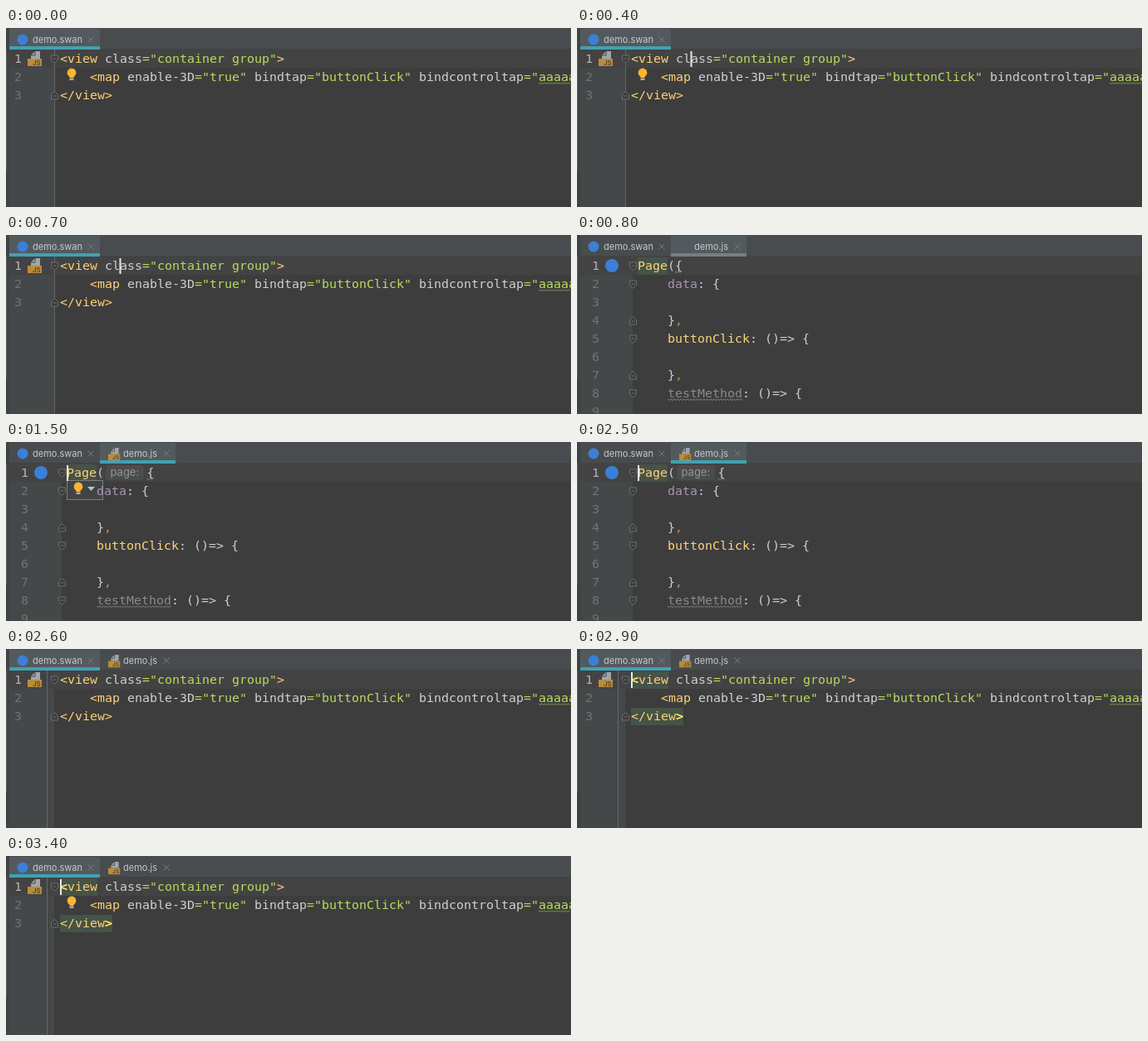
An HTML page with a canvas that plays this animation: 680 by 216 pixels, repeating every 3.5 s.

```html
<!DOCTYPE html>
<html lang="en">
<head>
<meta charset="utf-8">
<title>Editor navigation</title>
<style>
  html, body { margin: 0; width: 100%; height: 100%; overflow: hidden; background: #3d3d3d; }
  canvas { display: block; width: 680px; height: 216px; }
</style>
</head>
<body>
<canvas id="stage" width="680" height="216"></canvas>
<script>
const ctx = document.getElementById('stage').getContext('2d');
const LOOP = 3500, W = 680, H = 216, ROW = 22, CHAR = 9;
const MONO = '14.95px "DejaVu Sans Mono", monospace';
const UI = 'Inter, sans-serif';
const C = {
  bar: '#484c4f', tab: '#535a5d', teal: '#42a0b2', idle: '#787e82',
  editor: '#3d3d3d', line: '#434343', gutter: '#454849', guide: '#646768',
  num: '#707476', numOn: '#b5b5b5', tag: '#ffd078', attr: '#d0d0d0',
  str: '#b8dc5e', plain: '#c8d0d6', fn: '#ffd27a', prop: '#a893bb',
  comma: '#d28a45', unused: '#898989', match: '#465347', caret: '#e8e8e8',
  blue: '#3b7fd6', amber: '#b98d3c', page: '#a0a6aa', bulb: '#fbb52e'
};

// Each code line is a list of [text, colour] runs, starting at a column.
const swanCode = [
  [0, ['<view ', C.tag], ['class', C.attr], ['="container group"', C.str], ['>', C.tag]],
  [4, ['<map ', C.tag], ['enable-3D', C.attr], ['="true" ', C.str], ['bindtap', C.attr],
    ['="buttonClick" ', C.str], ['bindcontroltap', C.attr], ['="aaaaaaa', C.str]],
  [0, ['</view>', C.tag]]
];
const jsCode = [
  [0, ['Page', C.fn], ['(', C.plain]],
  [4, ['data', C.prop], [': {', C.plain]],
  [0],
  [4, ['}', C.plain], [',', C.comma]],
  [4, ['buttonClick', C.fn], [': ()=> {', C.plain]],
  [0],
  [4, ['}', C.plain], [',', C.comma]],
  [4, ['testMethod', C.unused], [': ()=> {', C.plain]],
  [0]
];

const rowY = row => 37 + row * ROW;

function rect(x, y, w, h, color) {
  ctx.fillStyle = color;
  ctx.fillRect(x, y, w, h);
}

function text(s, x, y, color, font = MONO) {
  ctx.font = font;
  ctx.fillStyle = color;
  ctx.fillText(s, x, y);
}

function trace(points) {
  ctx.beginPath();
  points.forEach(([x, y]) => ctx.lineTo(x, y));
}

function fill(points, color) {
  trace(points);
  ctx.fillStyle = color;
  ctx.fill();
}

function stroke(points, color, width = 1, close = false) {
  trace(points);
  if (close) ctx.closePath();
  ctx.strokeStyle = color;
  ctx.lineWidth = width;
  ctx.stroke();
}

function dot(x, y, r, color) {
  ctx.beginPath();
  ctx.arc(x, y, r, 0, Math.PI * 2);
  ctx.fillStyle = color;
  ctx.fill();
}

function wave(x, end, y, color) {
  const points = [];
  for (let i = 0; x + i * 2 <= end; i++) points.push([x + i * 2, y + (i % 2 ? 1.5 : 0)]);
  stroke(points, color, 0.9);
}

function scriptIcon(x, y, scale) {
  ctx.save();
  ctx.translate(x, y);
  ctx.scale(scale, scale);
  fill([[9, 0], [15, 0], [15, 9], [4, 9], [4, 5]], C.page);
  stroke([[4, 5], [9, 5], [9, 0]], C.gutter);
  rect(0, 9, 17, 9, C.amber);
  text('JS', 6, 16.5, '#3f3a2c', `500 8px ${UI}`);
  ctx.restore();
}

function bulb(x, y) {
  dot(x, y - 2, 5.4, C.bulb);
  rect(x - 2.5, y + 2, 5, 2.5, C.bulb);
  rect(x - 2.5, y + 5.2, 5, 1.8, '#b5b5b5');
}

function fold(x, y, dir) {
  const shape = [[-4, -4.5], [4, -4.5], [4, 1], [0, 5], [-4, 1]]
    .map(([a, b]) => [x + a, y + b * dir]);
  fill(shape, C.editor);
  stroke(shape, '#6b6f70', 1, true);
  stroke([[x - 2, y - 0.5 * dir], [x + 2, y - 0.5 * dir]], '#6b6f70');
}

function tab(x, w, label, active, accent) {
  if (active) {
    rect(x, 1, w, 24, C.tab);
    rect(x, 22, w, 4, accent);
  }
  text(label, x + 28, 18, '#c6c9cb', `11px ${UI}`);
  const cx = x + w - 11;
  stroke([[cx - 3.5, 10.5], [cx + 3.5, 17.5]], '#747a7d');
  stroke([[cx + 3.5, 10.5], [cx - 3.5, 17.5]], '#747a7d');
}

function frame(gutterEnd, numX, rows) {
  rect(0, 0, W, H, C.editor);
  rect(0, 26, gutterEnd, H - 26, C.gutter);
  rect(4, 26, W - 4, 22, C.line);
  rect(0, 0, W, 25, C.bar);
  rect(0, 25, W, 1, '#404344');
  rect(0, 0, 4, H, '#3f4345');
  rect(0, 26, 1, 146, '#5a5e60');
  for (let i = 0; i < rows; i++) {
    text(String(i + 1), numX, rowY(i) + 5, i ? C.num : C.numOn);
  }
}

function code(lines, left) {
  lines.forEach(([col, ...runs], row) => {
    let x = left + col * CHAR;
    for (const [s, color] of runs) {
      text(s, x, rowY(row) + 5, color);
      x += s.length * CHAR;
    }
  });
}

function caret(x) {
  rect(x, 28, 2, 19, C.caret);
}

function drawSwan(t) {
  const back = t >= 2600;
  const focused = t >= 2800;
  frame(58, 10, 3);
  tab(4, 109, 'demo.swan', true, C.teal);
  dot(20, 14, 6.5, C.blue);
  if (back) {
    tab(113, 91, 'demo.js', false);
    scriptIcon(123, 7, 0.84);
  }
  rect(back ? 49 : 58, 26, 1, H - 26, C.guide);
  scriptIcon(26, 28, 1);
  if (focused) {
    rect(65, 27, 45, 21, C.match);
    rect(65, 71, 63, 21, C.match);
  }
  fold(58.5, 37.5, 1);
  fold(58.5, 81.5, -1);
  code(swanCode, 65);
  wave(641, W, 66, '#7f9b55');
  if (focused) {
    const bold = 'bold ' + MONO;
    text('<', 65, 42, '#ffe45c', bold);
    text('>', 65 + 6 * CHAR, 86, '#ffe45c', bold);
    caret(65);
  }
  if (t < 600 || t >= 3200) bulb(79, 56);
  if (!back && t >= 400) caret(136.5);
}

function drawJs(t) {
  const ready = t >= 900;
  frame(67, 18, 9);
  tab(4, 109, 'demo.swan', false);
  dot(20, 14, 6.5, C.blue);
  tab(113, 91, 'demo.js', true, ready ? C.teal : C.idle);
  if (ready) scriptIcon(123, 7, 0.84);
  dot(42, 37, 8, C.blue);
  rect(73, 27, 36, 21, C.match);
  [0, 1, 4, 7].forEach(row => fold(67.5, rowY(row) + 0.5, 1));
  [3, 6].forEach(row => fold(67.5, rowY(row) + 0.5, -1));

  if (t >= 1400 && t < 2300) {
    rect(73, 46, 44, 24, '#414445');
    ctx.strokeStyle = '#7b7d7e';
    ctx.lineWidth = 1;
    ctx.strokeRect(73.5, 46.5, 43, 23);
    bulb(87, 56);
    fill([[98, 54], [107, 54], [102.5, 59]], '#c0c3c5');
  }
  code(jsCode, 73);

  const braceX = ready ? 169.5 : 73 + 5 * CHAR;
  if (ready) {
    ctx.beginPath();
    ctx.roundRect(120, 28, 46, 18, 4);
    ctx.fillStyle = '#4b4c4c';
    ctx.fill();
    text('page:', 125.5, 41, '#929595', `13px ${UI}`);
  }
  text('{', braceX, 42, C.plain);
  wave(braceX, braceX + 9, 44, '#8d8d8d');
  wave(109, 199, 198, '#858585');
  if (ready && (t + 600) % 1000 < 500) caret(73);
}

function tick(now) {
  const t = now % LOOP;
  (t >= 800 && t < 2600 ? drawJs : drawSwan)(t);
  requestAnimationFrame(tick);
}
tick(0);
</script>
</body>
</html>
```
